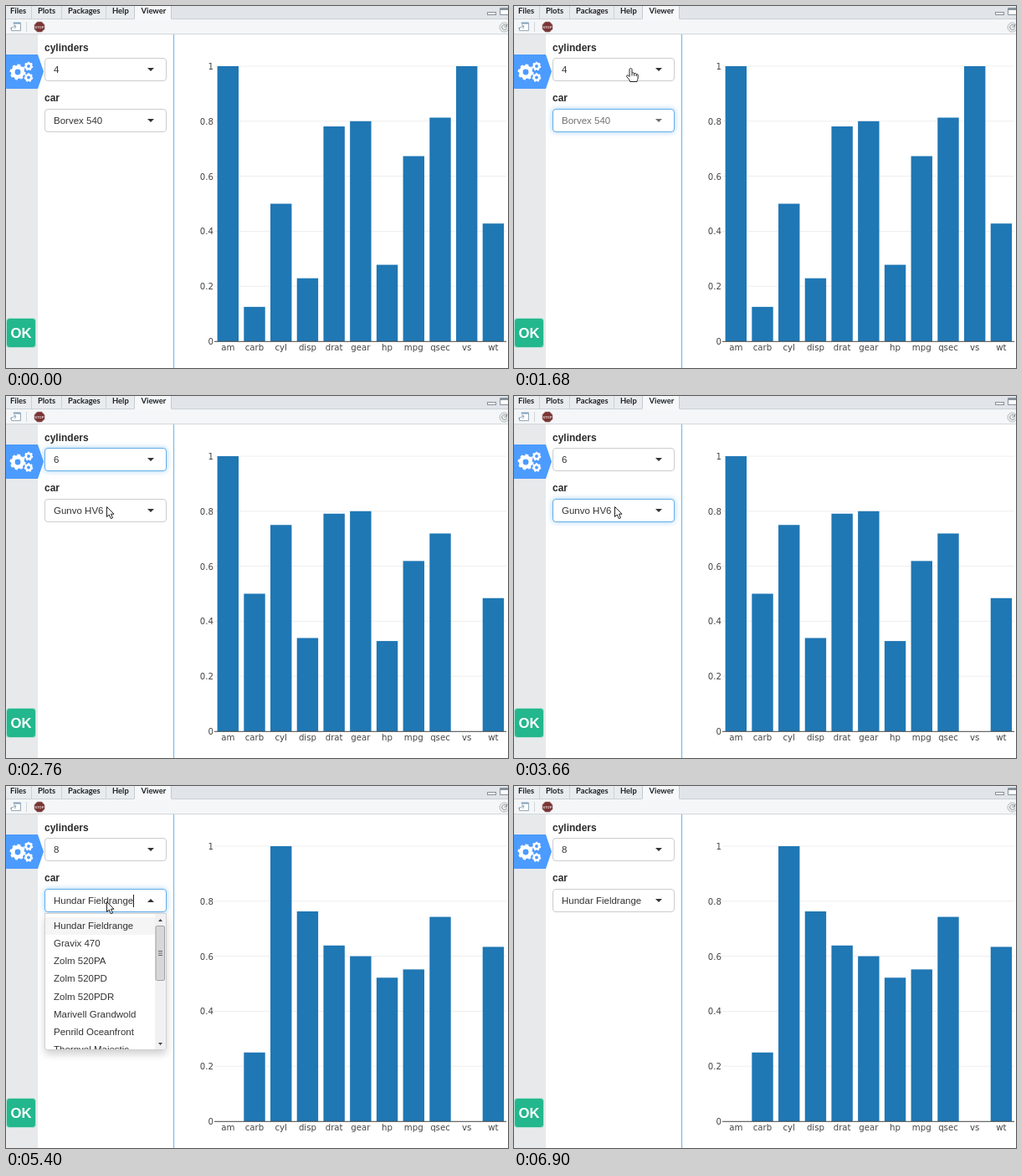
Animation of 600 by 433 pixels, one loop 6960 ms. Source, as an HTML page:

```html
<!DOCTYPE html>
<html lang="en">
<head>
<meta charset="utf-8">
<title>Viewer pane</title>
<style>
  html, body { margin: 0; width: 100%; height: 100%; overflow: hidden; background: #fff; }
  #stage { position: relative; width: 600px; height: 433px; overflow: hidden; background: #fff;
    font: 11.5px "Liberation Sans", Arial, sans-serif; color: #333; }
  #stage > * { position: absolute; box-sizing: border-box; }
  #base, #cursor { left: 0; top: 0; }
  .tab { font: 700 9.4px Lato, sans-serif; fill: #1c2126; }
  .axis { font: 10.2px "DejaVu Sans", Verdana, sans-serif; fill: #444; }
  .label { font: bold 12px "Liberation Sans", Arial, sans-serif; fill: #2b2b2b; }
  .select { left: 46px; width: 146px; height: 28px; padding-left: 10px; line-height: 27px;
    border: 1px solid #ccc; border-radius: 4px; background: #fff; white-space: nowrap; }
  .select.focus { border-color: #66afe9; box-shadow: 0 0 6px rgba(102, 175, 233, .6); }
  .select.dim span, .select.dim::after { opacity: .7; }
  .select::after { content: ""; position: absolute; left: 122px; top: 11px;
    border: 4px solid transparent; border-width: 4.5px 4.5px 0; border-top-color: #333; }
  .select.open::after { border-width: 0 4.5px 4.5px; border-bottom-color: #333; }
  .select.open span { padding: 1px 0 2px; border-right: 1px solid #222; }
  .menu { left: 46px; width: 146px; padding: 4px 0; overflow: hidden; background: #fff;
    border: 1px solid #d0d0d0; border-radius: 0 0 4px 4px; box-shadow: 0 5px 10px rgba(0, 0, 0, .18); }
  .menu div { height: 21.15px; line-height: 21.15px; padding-left: 10px; white-space: nowrap; }
  .menu .on { background: #f5f5f5; }
  .menu svg { position: absolute; right: 0; top: 0; }
</style>
</head>
<body>
<div id="stage">
  <svg id="base" width="600" height="433" viewBox="0 0 600 433">
    <rect width="600" height="16" fill="#e1e5e9"/>
    <path d="M0 0H153V15H0Z" fill="#e9ecef"/>
    <path d="M30.5 0V15M66.5 0V15M119.5 0V15M0 15.5H600" stroke="#cbd1d6"/>
    <rect y="16" width="600" height="17" fill="#f4f6f8"/>
    <path d="M153.500 16V0H197.500V16Z" fill="#f6f8f9"/>
    <path d="M153.500 15V0M197.500 15V0" stroke="#c3cad0"/>
    <path d="M0 33.500H600" stroke="#d3d7da"/>
    <g class="tab">
      <text x="5" y="9">Files</text><text x="38" y="9">Plots</text><text x="74" y="9">Packages</text>
      <text x="127" y="9">Help</text><text x="161.500" y="9">Viewer</text>
    </g>
    <!-- window and toolbar icons -->
    <g fill="#fff" stroke="#87919a">
      <rect x="575.500" y="7.500" width="10" height="3"/>
      <path d="M600 2.500H590.500V10.500H600"/>
      <path d="M591 4H600" stroke-width="2"/>
      <circle cx="595.500" cy="25.500" r="5.500" fill="#eef0f1" stroke="#b4b8bb"/>
      <path d="M598 23.500A3 3 0 1 0 598.500 26.500M598.500 22V25H595.500" fill="none" stroke="#8c9195"/>
      <path d="M8.500 20.500H17.500V29.500H6.500V25.500" stroke="#9aabb8"/>
      <path d="M9 20.500H17.500" stroke="#7f9fb8" stroke-width="2"/>
      <path d="M5 27L11 24M9 22.500L12 24L10.500 27" fill="none" stroke="#8aa4b5"/>
      <path d="M24.500 19V31" stroke="#d2d6d9"/>
    </g>
    <path d="M37.400 19H42.600L46 22.400V27.600L42.600 31H37.400L34 27.600V22.400Z" fill="#7b3434" stroke="#9b7474" stroke-width=".6"/>
    <text x="40" y="26.500" font-size="4" font-weight="bold" text-anchor="middle" fill="#eadada">STOP</text>
    <!-- side strip -->
    <rect y="34" width="38" height="399" fill="#e7e9eb"/>
    <path d="M0 58H38L45 78.500L38 99H0Z" fill="#4c9bff"/>
    <g id="gears" fill="none" stroke="#fff"></g>
    <rect x=".5" y="373.500" width="35" height="35" rx="3.500" fill="#23b78d" stroke="#b9e3d6"/>
    <text x="18" y="397" font-size="16.700" font-weight="bold" text-anchor="middle" fill="#fff">OK</text>
    <path d="M200.500 34V433" stroke="#80bdeb" stroke-width="1.300"/>
    <text class="label" x="46" y="54">cylinders</text>
    <text class="label" x="46" y="114">car</text>
    <g id="grid" class="axis"></g>
    <g id="bars" fill="#1f77b4"></g>
    <path d="M249 401.300H598" stroke="#444" stroke-width="1"/>
  </svg>
  <div id="cyl" class="select" style="top:62px"><span></span></div>
  <div id="car" class="select" style="top:122.500px"><span></span></div>
  <div id="cylMenu" class="menu" style="top:92px"></div>
  <div id="carMenu" class="menu" style="top:152px;max-height:164px"></div>
  <svg id="cursor" width="20" height="24" overflow="visible" stroke="#222" fill="#fff">
    <path id="arrow" d="M.5.500V12.500L3.300 10L5.400 14.700L7.500 13.800L5.500 9.200H9Z"/>
    <path id="hand" stroke-linejoin="round" d="M0 .5C1 .5 1.500 1.200 1.500 2V6.300C2 5.500 4 5.600 4.200 6.800C4.800 6.200 6.500 6.400 6.700 7.600C7.300 7.200 8.700 7.500 8.700 8.900V12C8.700 14 7.500 14.500 7.500 16.500H-.8C-1 14.500-3 13-4.800 10.300C-5.500 9-3.700 8.200-2.800 9.200L-1.500 10.500V2C-1.500 1.200-1 .5 0 .5ZM1.500 6.500V9.500M4.200 7V9.700M6.700 8V10"/>
    <path id="beam" fill="none" d="M-3-5.500H-1L0-5L1-5.500H3M0-5V5M-3 5.500H-1L0 5L1 5.500H3"/>
  </svg>
</div>
<script>
const LOOP = 6960, STEP = 60;
const $ = id => document.getElementById(id);

const names = ["am", "carb", "cyl", "disp", "drat", "gear", "hp", "mpg", "qsec", "vs", "wt"];
const groups = [
  { cyl: "4", thumb: 86,
    cars: ["Borvex 540", "Zolm 310B", "Zolm 320", "Telt 164", "Vondu Tivik", "Kelova Sarella", "Kelova Sarenu", "Telt K2-7"],
    bars: [1, .125, .5, .229, .781, .8, .278, .673, .813, 1, .428] },
  { cyl: "6",
    cars: ["Gunvo HV6", "Gunvo HV6 Van", "Hundar 5 Trail", "Ardelin", "Zolm 350", "Zolm 350B", "Ostrel Piko"],
    bars: [1, .5, .75, .339, .791, .8, .328, .619, .719, 0, .484] },
  { cyl: "8", thumb: 66,
    cars: ["Hundar Fieldrange", "Gravix 470", "Zolm 520PA", "Zolm 520PD", "Zolm 520PDR", "Marivell Grandwold", "Penrild Oceanfront", "Thornvel Majestic"],
    bars: [0, .25, 1, .763, .639, .6, .522, .552, .743, 0, .634] }
];

// Cursor path: time, x, y
const path = [
  [120, 588, 343], [600, 140, 136], [1440, 140, 136], [1680, 139.5, 74], [1860, 139, 74],
  [2160, 132, 122], [2400, 132, 124], [2760, 120, 132], [3840, 120, 132], [4080, 129, 76],
  [4260, 129, 76], [4500, 128.5, 105], [4680, 127, 146], [4800, 127, 146], [5160, 120, 138],
  [6120, 120, 138], [6780, 594, 434]
];
const shapes = [[0, "arrow"], [600, "beam"], [1140, "hand"], [2640, "arrow"], [3960, "hand"], [5040, "arrow"]];
const focus = [[0, ""], [660, "car"], [1860, "cyl"], [3000, "car"], [4260, "cyl"], [5340, "car"], [6900, ""]];
const opened = [[0, ""], [660, "car"], [1140, ""], [1860, "cyl"], [2400, ""], [3120, "car"], [3660, ""],
  [4260, "cyl"], [4800, ""], [5400, "car"], [5820, ""]];
const picked = [[0, 0], [2400, 1], [4800, 2]];
const plotted = [[0, 0], [2460, 1], [4860, 2]];

const at = (track, t) => track.filter(k => k[0] <= t).pop()[1];
const barX = i => 265.3 + 31.71 * i;
const barY = v => 401 - 329 * v;

function cursorAt(t) {
  if (t < path[0][0] || t >= path[path.length - 1][0]) return null;
  const i = path.findIndex(p => p[0] > t);
  const [t0, x0, y0] = path[i - 1], [t1, x1, y1] = path[i];
  const u = (t - t0) / (t1 - t0), e = u * u * (3 - 2 * u);
  return [x0 + (x1 - x0) * e, y0 + (y1 - y0) * e];
}

function scrollbar(thumb) {
  const grip = 14 + thumb / 2;
  return `<svg width="13" height="162"><rect width="13" height="162" fill="#f1f1f1"/>
    <path d="M4 9L6.500 6L9 9ZM4 154L6.500 157L9 154Z" fill="#444"/>
    <rect x="1" y="14.500" width="10.500" height="${thumb - 1}" rx="1.500" fill="#d8d8d8" stroke="#a0a0a0"/>
    <path d="M4 ${grip - 2.5}h5m-5 2.500h5m-5 2.500h5" stroke="#666"/></svg>`;
}

const rows = (items, on) => items.map((s, i) => `<div${i === on ? ' class="on"' : ""}>${s}</div>`).join("");

function drawStatic() {
  const gear = (x, y, r, n) =>
    `<circle cx="${x}" cy="${y}" r="${r * .62}" stroke-width="${r * .5}"/>
     <circle cx="${x}" cy="${y}" r="${r * .88}" stroke-width="${r * .28}" pathLength="${2 * n}" stroke-dasharray="1"/>`;
  $("gears").innerHTML = gear(14, 79, 9.3, 8) + gear(27, 72, 5.2, 7) + gear(27, 85.5, 5.2, 7);
  let grid = "";
  for (let k = 0; k <= 5; k++) {
    const y = barY(k / 5);
    if (k) grid += `<path d="M249 ${y}H598" stroke="#eee"/>`;
    grid += `<text x="248" y="${y + 4}" text-anchor="end">${k / 5}</text>`;
  }
  names.forEach((s, i) => grid += `<text x="${barX(i)}" y="412" text-anchor="middle">${s}</text>`);
  $("grid").innerHTML = grid;
}

function draw(t) {
  const cyl = at(picked, t), plot = at(plotted, t), group = groups[plot];
  const open = at(opened, t), focused = at(focus, t), pos = cursorAt(t);

  $("bars").innerHTML = group.bars.map((v, i) =>
    `<rect x="${barX(i) - 12.7}" y="${barY(v)}" width="25.400" height="${329 * v}"/>`).join("");

  const text = { cyl: groups[cyl].cyl, car: group.cars[0] };
  for (const id of ["cyl", "car"]) {
    const el = $(id);
    el.firstChild.textContent = text[id];
    el.classList.toggle("focus", focused === id);
    el.classList.toggle("open", open === id);
    $(id + "Menu").style.display = open === id ? "block" : "none";
  }
  $("car").classList.toggle("dim", t >= 1140 && t < 1860);

  if (open === "cyl") {
    const row = pos[1] < 97 ? cyl : Math.min(2, Math.floor((pos[1] - 97) / 21.15));
    $("cylMenu").innerHTML = rows(groups.map(g => g.cyl), row);
  }
  if (open === "car")
    $("carMenu").innerHTML = rows(group.cars, 0) + (group.thumb ? scrollbar(group.thumb) : "");

  $("cursor").style.display = pos ? "block" : "none";
  if (pos) {
    $("cursor").style.transform = `translate(${pos[0]}px, ${pos[1]}px)`;
    const shape = at(shapes, t);
    for (const id of ["arrow", "hand", "beam"]) $(id).style.display = id === shape ? "" : "none";
  }
}

drawStatic();
const start = performance.now();
let last = -1;
function tick() {
  const t = Math.floor((performance.now() - start) % LOOP / STEP) * STEP;
  if (t !== last) draw(last = t);
  requestAnimationFrame(tick);
}
tick();
</script>
</body>
</html>
```
